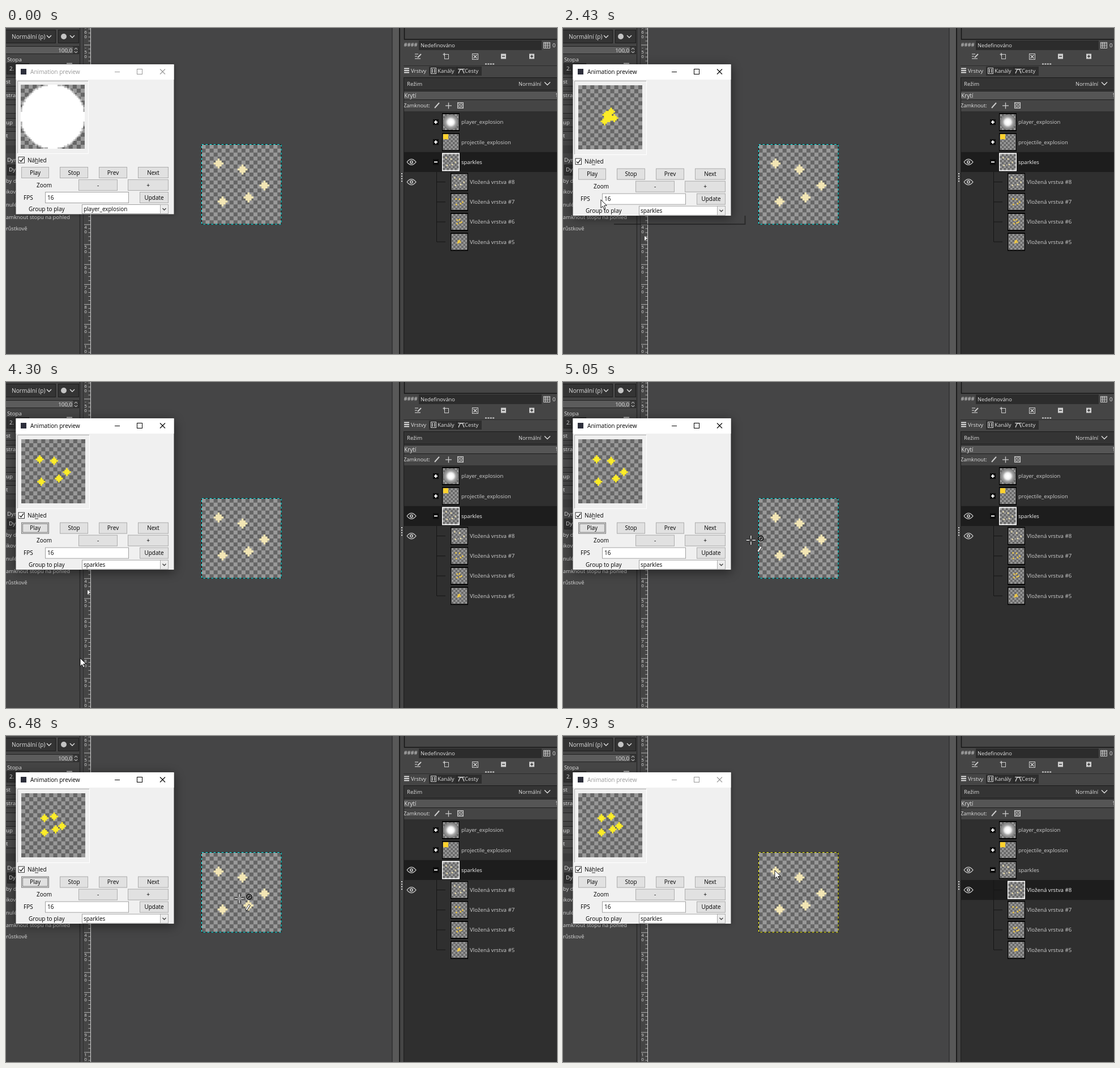
Animation, 973 px wide and 575 px high, one loop 8000 ms. Source, as an HTML page with a canvas:

```html
<!DOCTYPE html>
<html lang="cs">
<head>
<meta charset="utf-8">
<title>Animation preview</title>
<style>
html, body { margin: 0; width: 100%; height: 100%; overflow: hidden; background: #454545; }
canvas { display: block; }
</style>
</head>
<body>
<canvas id="stage" width="973" height="575"></canvas>
<script>
const c = document.getElementById('stage').getContext('2d');
const LOOP = 8000, LIGHT = '#e0e0e0', EDGE = '#222';
const GROUPS = ['player_explosion', 'projectile_explosion', 'sparkles'];

// cursor stops: time, x, y
const PATH = [
  [120, 671, 546], [400, 520, 440], [700, 300, 352], [860, 236, 327], [930, 231, 320],
  [1330, 228, 322], [1500, 190, 350], [1680, 149, 381], [1950, 147, 377], [2160, 147, 381],
  [2290, 108, 345], [2430, 67, 303], [2800, 52, 262], [3140, 50, 257], [3500, 80, 350],
  [3830, 125, 475], [4000, 131, 487], [4350, 131, 487], [4700, 165, 470], [5000, 300, 330],
  [5200, 425, 130], [5400, 405, 7], [5530, 376, 9], [5590, 372, 14], [5790, 376, 278],
  [6420, 376, 278], [6750, 570, 325], [6950, 760, 315], [7160, 820, 272], [7300, 816, 282],
  [7600, 590, 262], [7860, 378, 238], [7930, 374, 237]
];

function box(x, y, w, h, fill, edge) {
  if (fill) { c.fillStyle = fill; c.fillRect(x, y, w, h); }
  if (edge) { c.strokeStyle = edge; c.lineWidth = 1; c.strokeRect(x + .5, y + .5, w - 1, h - 1); }
}

function text(s, x, y, size = 9.7, color = LIGHT, align = 'left') {
  c.font = `${size}px "Open Sans", "Noto Sans", sans-serif`;
  c.textAlign = align;
  c.fillStyle = color;
  c.fillText(s, x, y + size * .36);
}

function line(color, width, ...p) {
  c.beginPath();
  for (let i = 0; i < p.length; i += 2) c.lineTo(p[i], p[i + 1]);
  c.strokeStyle = color;
  c.lineWidth = width;
  c.stroke();
}

function disc(x, y, r, fill) {
  c.beginPath();
  c.arc(x, y, r, 0, 7);
  c.fillStyle = fill;
  c.fill();
}

const chevron = (x, y, color = LIGHT, r = 4) => line(color, 1.4, x - r, y - r / 2, x, y + r / 2, x + r, y - r / 2);

function checker(x, y, size, n) {
  const s = size / n;
  box(x, y, size, size, '#999');
  c.beginPath();
  for (let i = 0; i < n; i++)
    for (let j = 1 - i % 2; j < n; j += 2) c.rect(x + i * s, y + j * s, s, s);
  c.fillStyle = '#666';
  c.fill();
}

// five stars flying apart, k = 0..3, on a 40 x 40 image
function sparkles(x, y, size, k, color = k == 3 ? '#f2e5b4' : '#fcec28') {
  const p = size / 40;
  const stars = [
    [17 - 3 * k, 18 - 3 * k], [20, [16, 14, 13, 12][k]], [22 + 3 * k, 20],
    [Math.min(19 + 2 * k, 23), 20 + 2 * k], [16 - 2 * k, 22 + 2 * k]
  ];
  c.beginPath();
  for (const [sx, sy] of stars)
    for (let d = -2; d <= 2; d++) {
      const a = Math.abs(d);
      c.rect(x + (sx - 2 + a) * p, y + (sy + d) * p, (5 - 2 * a) * p, p);
    }
  c.fillStyle = color;
  c.fill();
}

// stepped circle on the same pixel grid, with a half-transparent rim
function pixelDisc(x, y, size) {
  const p = size / 40;
  for (const [r, alpha] of [[20.5, .5], [19.7, 1]]) {
    c.beginPath();
    for (let j = 0; j < 40; j++) {
      const half = Math.min(20, Math.round(Math.sqrt(Math.max(0, r * r - (j - 19.5) ** 2))));
      c.rect(x + (20 - half) * p, y + j * p, 2 * half * p, p);
    }
    c.fillStyle = `rgba(255,255,255,${alpha})`;
    c.fill();
  }
}

function ruler(marker) {
  box(138, 0, 12, 575, '#454545');
  line('#2c2c2c', 1, 136.5, 0, 136.5, 575);
  line('#d0d0d0', 1, 149.5, 0, 149.5, 575);
  for (let u = -60; u <= 106; u += 2) {
    const y = 206 + u * 3.52, major = u % 10 == 0;
    line('#d0d0d0', .8, major ? 138 : 145.5, y, 149, y);
    if (!major) continue;
    [...String(u)].forEach((ch, i) => text(ch, 140.5, y + 4.5 + i * 8, 8, '#dcdcdc', 'center'));
  }
  if (marker) {
    c.beginPath();
    c.moveTo(149, marker); c.lineTo(144, marker - 4); c.lineTo(144, marker + 4);
    c.closePath();
    c.fillStyle = '#f0f0f0';
    c.fill();
  }
}

function leftDock() {
  box(0, 0, 131, 575, '#454545');
  line('#2a2a2a', 1.5, 130.5, 0, 130.5, 575);
  box(-2, 3, 90, 24, '#343434', '#1c1c1c');
  text('Normální (p)', 10, 15, 10.2);
  chevron(76, 15);
  box(92, 3, 37, 24, '#343434', '#1c1c1c');
  disc(102, 15, 5, '#c4c4c4');
  chevron(117, 15);
  box(-2, 32, 131, 14, '#5c5c5c', EDGE);
  box(118, 33, 10, 12, '#3a3a3a');
  text('100,0', 117, 39, 9.8, LIGHT, 'right');
  line(LIGHT, 1, 121, 38, 123.5, 35, 126, 38);
  line(LIGHT, 1, 121, 41, 123.5, 44, 126, 41);
  text('Stopa', 2, 55.5);
  line('#ccc', 1.5, 107, 62.5, 117, 62.5);
  box(1, 62, 40, 20, '#2f2f2f', EDGE);
  text('2.', 6, 72);
  for (const [s, y] of [['st', 95], ['stra', 119], ['', 143], ['up', 167], ['t', 190]]) {
    box(-2, y - 8, 40, 16, '#4c4c4c', EDGE);
    text(s, 0, y);
  }
  box(0, 207, 30, 14, '#3c3c3c');
  text('Dyn', 2, 233);
  box(2, 241, 40, 19, '#2f2f2f', EDGE);
  text('Dy', 5, 250);
  ['by d', 'ikov', 'nulé', 'amknout stopu na pohled', 'růstkově']
    .forEach((s, i) => text(s, 0, [270, 289, 312, 334, 354][i], 9.4, '#d4d4d4'));
}

function eye(x, y) {
  c.beginPath();
  c.moveTo(x - 8, y);
  c.quadraticCurveTo(x, y - 10, x + 8, y);
  c.quadraticCurveTo(x, y + 10, x - 8, y);
  c.strokeStyle = '#ccc';
  c.lineWidth = 1.2;
  c.stroke();
  disc(x, y, 3, '#ccc');
  disc(x, y, 1.4, '#2a2a2a');
}

function layerRow(i, name, selected, hover) {
  const y = 166 + i * 35.2, child = i > 2, x = child ? 785 : 770;
  if (selected) box(702, y - 17.6, 271, 35.2, '#1d1d1d');
  if (child) line('#151515', 1, 760.5, y, 776, y);
  else {
    box(754, y - 5, 10, 10, '#0c0c0c');
    line('#fff', 2, 756, y, 762, y);
    if (i < 2) line('#fff', 2, 759, y - 3, 759, y + 3);
  }
  box(x, y - 16, 31, 32, selected ? '#fff' : '#050505');
  checker(x + 1.5, y - 14, 28, 8);
  if (i == 0) {
    const g = c.createRadialGradient(785.5, y, 2, 785.5, y, 14);
    [[0, '#fff'], [.3, '#f0f0f0'], [.6, '#a0a0a0'], [.85, '#888'], [1, '#666']].forEach(s => g.addColorStop(...s));
    disc(785.5, y, 13.5, g);
  } else if (i == 1) box(772, y - 14, 9, 9, '#ffd22e');
  else {
    const k = child ? 6 - i : 3;
    sparkles(x + 1.5, y - 14, 28, k, k == 3 ? '#e8dcae' : '#efc845');
  }
  if (i == 2 || i == 3) eye(716, y);
  if (hover) {
    line('#777', 1, 726.5, y - 8, 726.5, y + 8);
    line('#777', 1, 731.5, y - 8, 731.5, y + 8);
    line('#0c0c0c', 1, 750.5, y - 8, 750.5, y + 8);
  }
  text(name, child ? 819 : 804, y, child ? 9.7 : 9.5, selected ? '#f4f4f4' : '#cfcfcf');
}

function rightDock(t) {
  box(682, 0, 291, 575, '#454545');
  box(682, 0, 12, 575, '#585858');
  line(EDGE, 1, 682, 0, 682, 575);
  line('#1d1d1d', 2, 695, 0, 695, 575);
  for (let i = 0; i < 4; i++) {
    box(698, 256 + i * 4.4, 2, 2, '#ddd');
    box(846 + i * 4.4, 62.5, 3, 2, '#ccc');
    text('#', 702.5 + i * 6, 30, 9.5);
  }
  line('#161616', 1.5, 703.5, 0, 703.5, 20, 973, 20);
  box(729, 22, 217, 17, '#2c2c2c');
  text('Nedefinováno', 732, 30.5, 9.3);
  box(949, 25, 12, 11, null, '#ccc');
  for (const o of [3, 6.5]) {
    line('#ccc', 1, 949.5 + o, 25, 949.5 + o, 36);
    line('#ccc', 1, 949, 25 + o, 961, 25 + o);
  }
  text('0', 965, 30.5);

  // toolbar
  line('#ccc', 1.2, 722, 46, 728, 46);
  line('#ccc', 1.2, 722, 50, 726, 50);
  line('#ccc', 1.2, 722, 54, 732, 54);
  line('#ccc', 2, 727, 52, 733, 46);
  box(774, 46, 8, 9, null, '#ccc');
  line('#ccc', 1.3, 774, 44, 774, 49);
  line('#ccc', 1.3, 771.5, 46.5, 776.5, 46.5);
  box(823, 45, 11, 11, null, '#d0d0d0');
  line('#d0d0d0', 1.5, 825.5, 47.5, 831.5, 53.5);
  line('#d0d0d0', 1.5, 831.5, 47.5, 825.5, 53.5);
  for (const x of [878, 928]) {
    box(x - 4, 45.5, 9, 9, '#d0d0d0');
    line('#333', 1.4, x - 2, 50, x + 3, 50);
  }
  line('#333', 1.4, 928.5, 47.5, 928.5, 52.5);

  // tabs
  line('#2c2c2c', 1, 702, 66.5, 973, 66.5);
  box(747, 68, 93, 16, '#2e2e2e');
  line(EDGE, 1, 796.5, 68, 796.5, 84);
  for (let i = 0; i < 3; i++) line('#ddd', 2, 703, 71.5 + i * 3.5, 712, 71.5 + i * 3.5);
  text('Vrstvy', 715, 75.5, 9.6);
  box(750, 70, 10, 11, null, '#ccc');
  line('#ccc', 1.5, 753, 72, 753, 79);
  line('#ccc', 1.5, 757, 72, 757, 79);
  text('Kanály', 762, 75.5, 9.6);
  line('#ccc', 1.4, 799, 80, 802, 73, 806, 73, 809, 80);
  line('#ccc', 1.2, 798, 72.5, 810, 72.5);
  text('Cesty', 810, 75.5, 9.6);

  box(702, 87, 273, 23, '#343434', '#1c1c1c');
  text('Režim', 708, 98.5, 9.6);
  text('Normální', 905, 98.5, 9.2);
  chevron(956, 98, LIGHT, 5);
  box(702, 111, 273, 16, '#555', '#1c1c1c');
  text('Krytí', 703, 119, 10);
  text('1', 970, 119);
  text('Zamknout:', 702, 137, 9.3);
  line('#ccc', 2, 757, 141, 765, 132);
  line('#ccc', 1.3, 776, 137, 787, 137);
  line('#ccc', 1.3, 781.5, 131.5, 781.5, 142.5);
  checker(797, 131, 11, 4);
  box(797, 131, 11, 11, null, '#ccc');

  box(702, 147, 271, 428, '#2f2f2f');
  line('#1c1c1c', 1, 702.5, 87, 702.5, 575);
  const selected = t < 7230 ? 2 : 3, hover = t > 7080 && t < 7330;
  const names = [...GROUPS, ...[8, 7, 6, 5].map(n => 'Vložená vrstva #' + n)];
  names.forEach((name, i) => layerRow(i, name, i == selected, hover && i == 3));
  line('#151515', 1, 760.5, 254, 760.5, 377);
}

// the outline is cyan for a layer group and yellow for a single layer
function image(t) {
  checker(345.5, 205.6, 140.8, 20);
  sparkles(345.5, 205.6, 140.8, 3);
  box(345, 205, 141.6, 141.6, null, '#000');
  c.setLineDash([3.52, 3.52]);
  box(345, 205, 141.6, 141.6, null, t < 7230 ? '#00ffff' : '#ffff00');
  c.setLineDash([]);
}

function button(s, x, y, w, focus) {
  box(x, y, w, 20, '#e1e1e1', focus ? '#777' : '#adadad');
  if (focus) {
    c.setLineDash([1, 1]);
    box(x + 2, y + 2, w - 4, 16, null, '#222');
    c.setLineDash([]);
  }
  text(s, x + w / 2, y + 10, 10, '#000', 'center');
}

function dialog(t, cursorY) {
  const grown = t >= 2090, active = t >= 1000 && t < 7230, d = grown ? 2.64 : 0;
  const ink = active ? '#000' : '#999', bottom = 328.4 + d;

  if (t > 2290 && t < 3200) line('rgba(25,25,25,.6)', 2, 90, 346, 321.5, 346, 321.5, 331);
  c.save();
  c.shadowColor = active ? 'rgba(0,0,0,.5)' : 'rgba(0,0,0,.35)';
  c.shadowBlur = active ? 18 : 8;
  c.shadowOffsetY = active ? 4 : 1;
  box(17.5, 64.2, 279, bottom - 64.2, '#f0f0f0');
  c.restore();
  box(17.5, 64.2, 279, 26.8, '#fff');
  box(26, 72, 10, 10, '#2d2f3b');
  text('Animation preview', 43, 77.5, 10.1, ink);
  line(ink, 1, 192, 77.5, 201, 77.5);
  box(231, 72, 10, 10, null, ink);
  line(ink, 1.1, 272, 72.5, 281, 81.5);
  line(ink, 1.1, 281, 72.5, 272, 81.5);

  // preview
  const f = grown ? 1 : 0, right = 145 + 2 * f, low = 221 + 2 * f;
  line('#aaa', 1, right, 93.5, 20.5, 93.5, 20.5, low);
  line('#fff', 1, right + .5, 93, right + .5, low + .5, 20, low + .5);
  checker(26 + f, 100 + f, 113, 16);
  if (grown) sparkles(27, 101, 113, t < 3140 ? 0 : Math.floor((t + 135) % 250 / 62.5));
  else pixelDisc(26, 100, 113);

  c.save();
  c.translate(0, d);
  box(21.5, 227, 11.5, 11.5, '#fff', '#333');
  line('#111', 1.3, 24, 233, 26.5, 235.5, 31, 229.5);
  text('Náhled', 38, 233, 10, '#000');
  line('#000', .8, 51, 238.5, 57, 238.5);
  button('Play', 27, 245, 49, t >= 3140 && active);
  button('Stop', 95, 245, 50);
  button('Prev', 164, 245, 50);
  button('Next', 233, 245, 54);
  text('Zoom', 54, 277, 10, '#000');
  button('-', 128, 267, 69);
  button('+', 215, 267, 72);
  text('FPS', 31, 299, 10, '#000');
  box(69, 289, 148, 20, '#fff', '#a0a0a0');
  text('16', 73, 299, 10, '#000');
  button('Update', 236, 289, 51);
  text('Group to play', 40, 319.5, 10, '#000');
  box(134, 311, 153, 17, '#fff', '#a0a0a0');
  box(272, 311, 15, 17, '#ececec', '#adadad');
  chevron(279.5, 319.5, '#444', 3);
  text(GROUPS[grown ? 2 : 0], 137, 319.5, 9.9, '#000');
  c.restore();

  if (t >= 1060 && !grown) {
    box(134, 328, 154, 65, '#fff', '#777');
    const hot = Math.max(0, Math.min(2, Math.floor((cursorY - 328) / 21)));
    GROUPS.forEach((name, i) => {
      if (i == hot) box(135, 329 + i * 21, 152, 21, '#0078d7');
      text(name, 138, 339.5 + i * 21, 9.9, i == hot ? '#fff' : '#000');
    });
  }
}

function arrow(x, y) {
  c.beginPath();
  [[0, 0], [0, 14.5], [3.3, 11.4], [5.6, 16.6], [8, 15.6], [5.7, 10.5], [10.3, 10.3]]
    .forEach(([a, b]) => c.lineTo(x + a, y + b));
  c.closePath();
  c.fillStyle = '#fff';
  c.fill();
  c.strokeStyle = '#000';
  c.lineWidth = .9;
  c.stroke();
}

function crosshair(x, y) {
  for (const [color, w] of [['#000', 3], ['#fff', 1.6]])
    for (const [a, b] of [[1, 0], [-1, 0], [0, 1], [0, -1]])
      line(color, w, x + 2.5 * a, y + 2.5 * b, x + 8 * a, y + 8 * b);
  disc(x + 17.5, y - 3, 5, '#000');
  c.beginPath();
  c.arc(x + 17.5, y - 3, 3, 0, 7);
  c.strokeStyle = '#ddd';
  c.lineWidth = 1;
  c.stroke();
  line('#ddd', 1, x + 15.5, y - 5, x + 19.5, y - 1);
  line('#222', 4, x + 12, y + 21, x + 18.5, y + 11);
  line('#f0f0f0', 2.5, x + 12.5, y + 20, x + 18, y + 11.5);
}

function cursorAt(t) {
  const i = PATH.findIndex(p => p[0] > t);
  if (i < 0) return PATH[PATH.length - 1].slice(1);
  if (i == 0) return null;
  const [t0, x0, y0] = PATH[i - 1], [t1, x1, y1] = PATH[i], k = (t - t0) / (t1 - t0);
  return [x0 + (x1 - x0) * k, y0 + (y1 - y0) * k];
}

function draw(now) {
  const t = now % LOOP, pos = cursorAt(t), [x, y] = pos || [0, 0];
  const marker = t < 2090 ? pos && Math.max(y, t < 860 ? y : 337) : t < 4500 ? 371 : y;
  box(0, 0, 973, 575, '#454546');
  leftDock();
  ruler(marker);
  image(t);
  rightDock(t);
  dialog(t, y);
  if (pos) {
    const overDialog = x < 297 && y > 64 && y < 331;
    const onCanvas = x > 150 && x < 682 && !overDialog && t < 7230 && (t < 930 || t > 2290);
    (onCanvas ? crosshair : arrow)(x, y);
  }
  requestAnimationFrame(draw);
}
requestAnimationFrame(draw);
</script>
</body>
</html>
```
